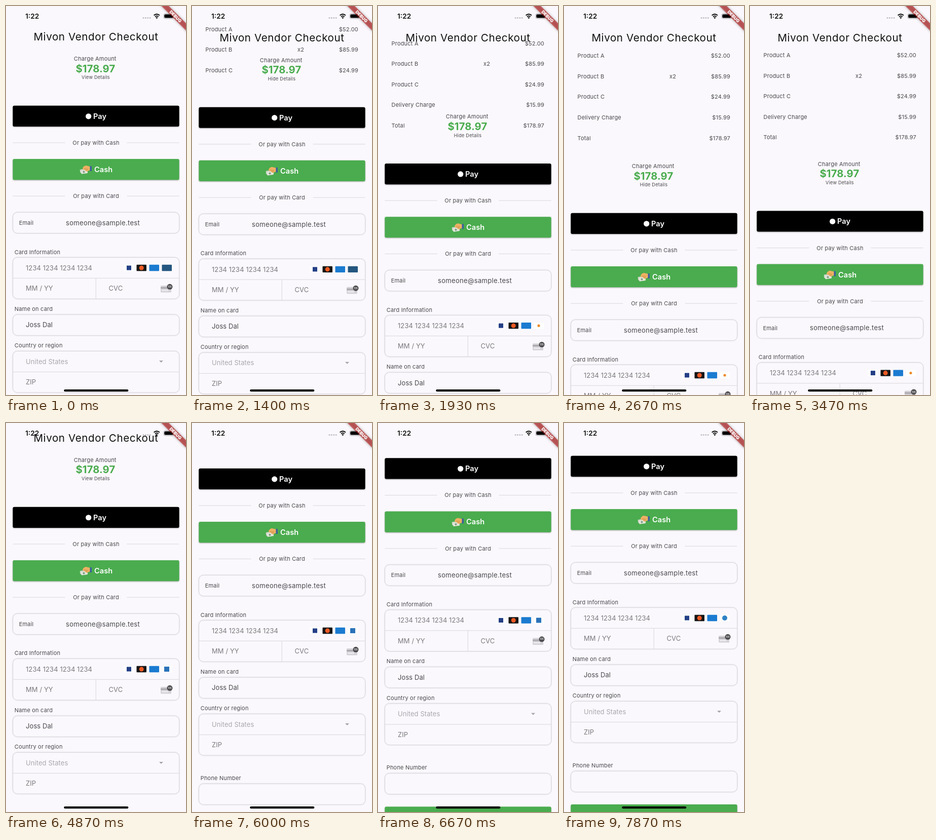
Animation, 355 px wide and 768 px high, one loop 8000 ms. Source, as an HTML page:

```html
<!DOCTYPE html>
<html lang="en">
<head>
<meta charset="utf-8">
<title>Checkout</title>
<style>
  html, body { margin: 0; width: 100%; height: 100%; overflow: hidden; background: #faf8fc; }
  svg { display: block; width: 100%; height: 100%; }
  text { font-family: Inter, Roboto, sans-serif; font-size: 11px; letter-spacing: .2px; fill: #4a484d; white-space: pre; }
  .title { font-size: 20.6px; letter-spacing: .58px; fill: #111; }
  .total { font-size: 20.2px; font-weight: 700; letter-spacing: .1px; fill: #4aac4e; }
  .link { font-size: 9.2px; }
  .input { font-size: 13px; letter-spacing: .08px; }
  .hint { fill: #7b797e; }
  .off { fill: #aaa8ad; }
  .mail { letter-spacing: .32px; }
  .btn { font-size: 14.6px; font-weight: 600; letter-spacing: 0; fill: #fff; }
  .clock { font-size: 13.7px; font-weight: 600; letter-spacing: 0; fill: #111; }
  .badge { font-size: 4.6px; font-weight: 600; letter-spacing: 0; fill: #fff; }
  .debug { font-size: 8.6px; font-weight: 900; letter-spacing: 0; fill: #fff; }
  .line { stroke: #d9d7dc; stroke-width: 1; fill: none; }
  .raised { filter: drop-shadow(0 1px 1px rgba(0, 0, 0, .32)); }
  .field { fill: #faf8fc; stroke: #d9d7db; filter: drop-shadow(0 .8px .8px rgba(0, 0, 0, .15)); }
</style>
</head>
<body>
<svg id="stage" viewBox="0 0 355 768"></svg>
<script>
const LOOP = 8000, OPEN_HEIGHT = 210, OPEN_AT = 1397, CLOSE_AT = 3450, SLIDE = 1000;
const ROW = 40.65, FIRST_ROW = 98;
const GREEN = '#4aac4e';

const rect = (x, y, w, h, fill, r = 0, extra = '') =>
  `<rect x="${x}" y="${y}" width="${w}" height="${h}" rx="${r}" fill="${fill}" ${extra}/>`;
const circle = (x, y, r, fill) => `<circle cx="${x}" cy="${y}" r="${r}" fill="${fill}"/>`;
const line = (x1, y1, x2, y2) => `<path class="line" d="M${x1} ${y1}L${x2} ${y2}"/>`;
const text = (x, y, str, cls = '', anchor = 'start', extra = '') =>
  `<text x="${x}" y="${y}" class="${cls}" text-anchor="${anchor}" ${extra}>${str}</text>`;
const button = (y, fill) => rect(13.4, y, 328.2, 41.2, fill, 3, 'class="raised"');
const field = (y, h = 41) => `<rect class="field" x="13.6" y="${y}" width="327.9" height="${h}" rx="9"/>`;
const divider = (y, label) =>
  line(13.4, y, 116.5, y) + line(238.5, y, 341.6, y) + text(177.5, y + 4, label, '', 'middle');

// Neutral card tile carrying one plain shape
const tile = (x, bg, shape) => rect(x, 512.8, 19.5, 12.4, bg, 1) + shape;
const rotating = [
  tile(307.5, '#24567f', ''),
  tile(307.5, '#fff', circle(317, 519, 2.6, '#ef8a2c')),
  tile(307.5, '#fff', rect(312, 514, 10, 10, '#2a72b8')),
  tile(307.5, '#fff', circle(317, 519, 5, '#2f82c6'))
];

const cashIcon =
  `<g transform="translate(145 316)">
    ${rect(1, 8, 13, 7, '#cfd6c8', 1.5, 'transform="rotate(-8 7 12)"')}
    ${rect(3, 10, 13, 7, '#e1e6da', 1.5, 'transform="rotate(-8 9 14)"')}
    ${circle(8.5, 13.6, 2, '#7f9a80')}
    <path d="M6 6Q9 1 13 1L21 3V10L16 12Q13 14 11 10L7 9Z" fill="#eeb063"/>
    <path d="M9 7L17 8M11 9.5L16 10" stroke="#c98a43" stroke-width=".8"/>
    ${rect(20.5, 2, 3.5, 10, '#3c5f9c', .8)}
  </g>`;

const cvcIcon =
  rect(305, 554, 21, 13.5, '#d4d2d6', 1.5) + rect(305, 557, 21, 3, '#aaa8ad') +
  rect(307, 562.5, 13, 2, '#f3f1f5') + circle(323, 556.3, 5.5, '#4b494d') +
  text(323, 558, '135', 'badge', 'middle');

const products = [
  ['Product A', '', '$52.00'],
  ['Product B', 'x2', '$85.99'],
  ['Product C', '', '$24.99'],
  ['Delivery Charge', '', '$15.99'],
  ['Total', '', '$178.97']
].map(([name, count, price], i) => {
  const y = FIRST_ROW + 4 + i * ROW;
  return `<g>${text(26.5, y, name)}${text(208, y, count)}${text(328, y, price, '', 'end')}</g>`;
}).join('');

const amount =
  text(175.7, 110, 'Charge Amount', '', 'middle') +
  text(176.4, 132.5, '$178.97', 'total', 'middle') +
  text(177, 146.4, 'View Details', 'link', 'middle', 'id="toggle"');

const form =
  `<g id="amount">${amount}</g>` +
  button(198.8, '#000') + circle(162.7, 219.8, 5.6, '#fff') + text(172, 224.8, 'Pay', 'btn') +
  divider(272, 'Or pay with Cash') +
  button(304, GREEN) + cashIcon + text(174, 330, 'Cash', 'btn') +
  divider(377.2, 'Or pay with Card') +
  field(409.5) + text(25.7, 434, 'Email') + text(118, 434.7, 'someone@sample.test', 'input mail') +
  text(16.7, 491.5, 'Card Information') + field(498.5, 81.5) +
  line(14, 539.3, 341, 539.3) + line(177.3, 539.3, 177.3, 580) +
  text(39, 523.7, '1234 1234 1234 1234', 'input hint') +
  text(39, 564.2, 'MM / YY', 'input hint') + text(202.5, 564.2, 'CVC', 'input hint') +
  tile(232.5, '#fff', rect(238, 514.5, 9, 9, '#243f86')) +
  tile(257.5, '#151515', circle(267.2, 519, 4.5, '#ee5a24')) +
  tile(282.5, '#1b7bd0', '') +
  '<g id="brand"></g>' + cvcIcon +
  text(16.7, 604, 'Name on card') + field(611.3) + text(39, 636.4, 'Joss Dal', 'input') +
  text(16.7, 676.4, 'Country or region') + field(683.5, 81.5) + line(14, 724.5, 341, 724.5) +
  text(39, 708.6, 'United States', 'input off') +
  '<path d="M302 702H310L306 706Z" fill="#a5a3a8"/>' +
  text(39, 749.2, 'ZIP', 'input hint') +
  text(16.7, 814, 'Phone Number') + field(821.3) +
  button(887, GREEN) + text(177.5, 913, 'Pay', 'btn', 'middle');

const statusBar =
  text(38, 25, '1:22', 'clock') +
  [271, 275.4, 279.8, 284.2].map(x => circle(x, 23.5, 1.6, '#c3c1c6')).join('') +
  `<g fill="none" stroke="#111" stroke-width="2">
    <path d="M291.6 18.6Q297.3 13.6 303 18.6M293.9 21.2Q297.3 18.3 300.7 21.2"/>
  </g><path d="M295.1 22.9Q297.3 21.3 299.5 22.9L297.3 25.2Z" fill="#111"/>` +
  rect(310.8, 15.2, 20.5, 9.8, 'none', 3, 'stroke="#a9a7ac" stroke-width=".9"') +
  rect(312.2, 16.6, 17.7, 7, '#000', 1.8);

const debugBanner =
  `<g transform="translate(355 0) rotate(45)">
    ${rect(-40, 24, 80, 10.3, '#b71c1c', 0, 'fill-opacity=".63" style="filter:drop-shadow(0 0 2.5px rgba(0,0,0,.5))"')}
    ${text(0, 32.2, 'DEBUG', 'debug', 'middle')}
  </g>`;

document.getElementById('stage').innerHTML =
  `${rect(0, 0, 355, 768, '#faf8fc')}
  <g id="page">
    <g id="rows">${products}</g>
    <g id="form">${form}</g>
    ${text(177.5, 70.2, 'Mivon Vendor Checkout', 'title', 'middle')}
  </g>
  ${statusBar}${debugBanner}
  ${rect(114.3, 757, 127, 4.3, '#000', 2.1)}`;

const el = Object.fromEntries(
  ['page', 'rows', 'form', 'amount', 'toggle', 'brand'].map(id => [id, document.getElementById(id)]));
const rows = [...el.rows.children];
const move = (node, y) => node.setAttribute('transform', `translate(0 ${y.toFixed(2)})`);
const show = (node, on) => node.setAttribute('visibility', on ? 'visible' : 'hidden');
const progress = (t, start, length) => Math.min(1, Math.max(0, (t - start) / length));

const setOnChange = (node, key, value) => {
  if (node.dataset.value === String(key)) return;
  node.dataset.value = key;
  node.innerHTML = value;
};

function scrollAt(t) {
  if (t < OPEN_AT) return 2;
  return 134 * (1 - Math.pow(1 - progress(t, 4535, 2665), 2.1));
}

function render(t) {
  const open = OPEN_HEIGHT * (progress(t, OPEN_AT, SLIDE) - progress(t, CLOSE_AT, SLIDE));
  const scroll = scrollAt(t);
  const shift = (open - OPEN_HEIGHT) / 4;
  move(el.page, -scroll);
  move(el.form, open);
  move(el.rows, shift);

  // Items vanish whole once they leave their list's viewport
  rows.forEach((row, i) => show(row, open > 0 && FIRST_ROW + (i - .5) * ROW + shift < 125 + open));
  show(el.amount, 148 + open - scroll > 44);

  const label = t >= OPEN_AT && t < CLOSE_AT ? 'Hide Details' : 'View Details';
  setOnChange(el.toggle, label, label);
  const card = Math.max(0, Math.floor((t - 1870) / 3000) + 1);
  setOnChange(el.brand, card, rotating[card]);
}

const began = performance.now();
function tick() {
  render((performance.now() - began) % LOOP);
  requestAnimationFrame(tick);
}
tick();
</script>
</body>
</html>
```
